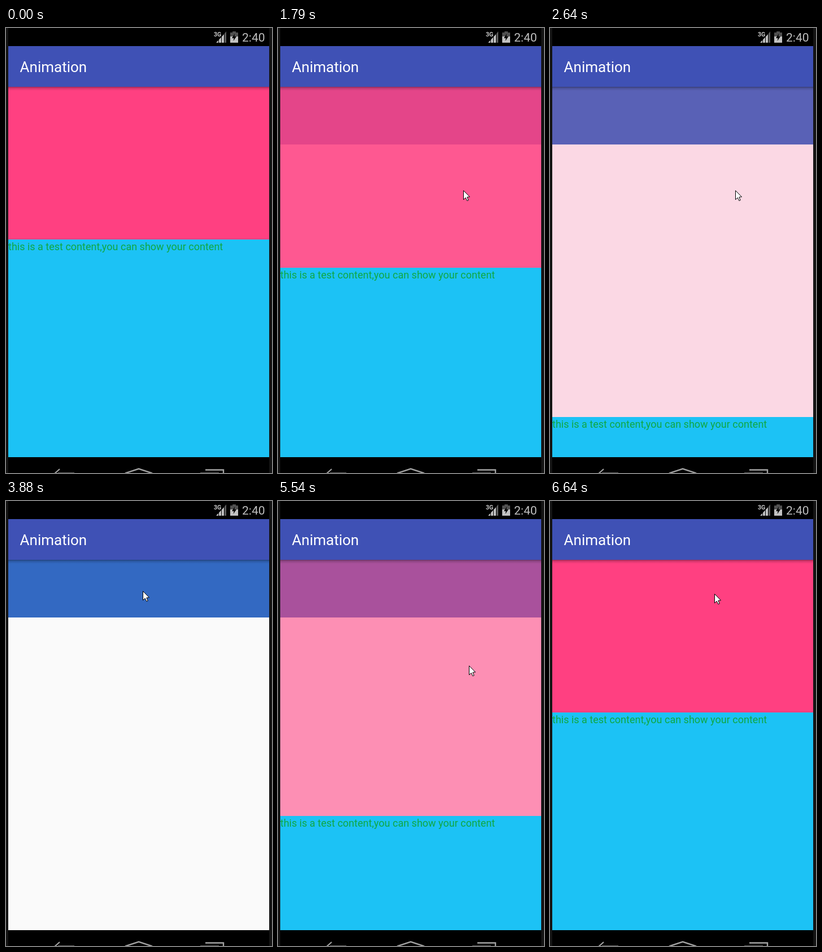
Recreate the animation shown at these times as an HTML page with a canvas. Size 471 px wide and 787 px high, loop 8 s.

```html
<!DOCTYPE html>
<html lang="en">
<head>
<meta charset="utf-8">
<title>Animation</title>
<style>
  html, body { margin: 0; width: 100%; height: 100%; overflow: hidden; background: #000; }
  canvas { display: block; width: 471px; height: 787px; }
</style>
</head>
<body>
<canvas id="stage" width="471" height="787"></canvas>
<script>
const ctx = document.getElementById('stage').getContext('2d');
const LOOP = 8000, FIRST_TICK = 675, TICK = 138.6, LAST_TICK = 43, RETURN_TICK = 27;
const LEFT = 4, WIDTH = 462, TOP = 104, BOTTOM = 759, HEADER_END = 206, REST = 374;
const PINK = [255, 64, 129], PAPER = [250, 250, 250], BLUE = [51, 105, 194];

// Key points: [tick, ...values], linear in between.
const SLIDE = [[4, 0], [8, 0.13], [11, 0.383], [14, 0.816], [18, 1],
  [RETURN_TICK, 1], [30, 0.912], [34, 0.737], [35, 0.475], [42, 0]];
const POINTER = [[0, 337, 377], [2, 328, 287], [17, 328, 287], [20, 199, 187], [23, 242, 159],
  [RETURN_TICK, 242, 159], [30, 282, 238], [35, 338, 291], [LAST_TICK, 291, 164]];

const mix = (a, b, k) => a + (b - a) * k;

function sample(track, tick) {
  const next = track.findIndex(row => row[0] > tick);
  if (next === 0) return track[0].slice(1);
  if (next < 0) return track[track.length - 1].slice(1);
  const a = track[next - 1], b = track[next];
  const k = (tick - a[0]) / (b[0] - a[0]);
  return a.slice(1).map((v, i) => mix(v, b[i + 1], k));
}

function blend(a, b, k) {
  return `rgb(${a.map((v, i) => Math.round(mix(v, b[i], k)))})`;
}

function box(color, x, y, w, h) {
  ctx.fillStyle = color;
  ctx.fillRect(x, y, w, h);
}

function band(color, from, to) {
  box(color, LEFT, from, WIDTH, to - from);
}

function label(str, x, y, size, color, weight = 400) {
  ctx.font = `${weight} ${size}px Roboto, sans-serif`;
  ctx.fontKerning = 'none';
  ctx.fillStyle = color;
  ctx.fillText(str, x, y);
}

function path(points, closed) {
  ctx.beginPath();
  points.forEach(([x, y]) => ctx.lineTo(x, y));
  if (closed) ctx.closePath();
}

function shape(color, ...points) {
  path(points, true);
  ctx.fillStyle = color;
  ctx.fill();
}

function line(color, width, ...points) {
  path(points);
  ctx.strokeStyle = color;
  ctx.lineWidth = width;
  ctx.stroke();
}

function statusBar() {
  band('#000', 0, 32);
  // signal
  shape('#c2c2c2', [372, 26], [386, 11], [386, 26]);
  shape('#5c5c5c', [386, 11], [390, 6], [390, 26], [386, 26]);
  for (let x = 376; x <= 386; x += 5) box('#000', x, 8, 1, 18);
  label('3G', 368, 15, 10.5, '#c8c8c8', 700);
  // charging battery
  box('#505050', 401, 6, 6, 3);
  box('#505050', 397, 8, 14, 8);
  box('#c2c2c2', 397, 15, 14, 11);
  shape('#000', [405, 10], [400, 18], [403.5, 18], [402.5, 23], [408, 15], [404.5, 15]);
  label('2:40', 418, 24, 21, '#c0c0c0');
}

function toolbar() {
  const shade = ctx.createLinearGradient(0, TOP, 0, TOP + 7);
  shade.addColorStop(0, 'rgba(0,0,0,.36)');
  shade.addColorStop(0.4, 'rgba(0,0,0,.14)');
  shade.addColorStop(1, 'rgba(0,0,0,0)');
  band(shade, TOP, TOP + 7);
  band('#3f51b5', 32, TOP);
  label('Animation', 24.6, 78, 26, '#fff');
}

function navBar() {
  const gray = '#a2a2a2', dim = '#666';
  band('#000', BOTTOM, 787);
  line(gray, 2.2, [85, 789], [95, 780]);
  box(dim, 92, 786, 29, 1);
  line(gray, 2.4, [211, 787.5], [235, 779.5], [259, 787.5]);
  line(gray, 2.4, [353, 781.5], [385, 781.5], [385, 788]);
  box(dim, 344, 786, 33, 1);
}

function panel(y) {
  if (y >= BOTTOM) return;
  band('#1cc2f5', y, BOTTOM);
  label('this is a test content,you can show your content', LEFT, y + 19, 18, '#10a843');
}

function pointer(x, y) {
  ctx.save();
  ctx.translate(Math.round(x) + 0.5, Math.round(y) + 0.5);
  const outline = [[0, 0], [0, 16], [3.7, 12.6], [6.3, 18], [8.7, 17], [6.3, 11.6], [11, 11.2]];
  shape('#fff', ...outline);
  line('#000', 1, ...outline, outline[0]);
  ctx.restore();
}

function draw(now) {
  const tick = Math.min(LAST_TICK, Math.floor((now % LOOP - FIRST_TICK) / TICK));
  const [open] = sample(SLIDE, tick);
  // On the way back the colours run slightly ahead of the panel.
  const fade = open - (tick > RETURN_TICK ? 0.21 * open * (1 - open) : 0);

  box('#141414', 0, 0, 471, 787);
  band(blend(PINK, PAPER, fade), TOP, BOTTOM);
  band(blend(PINK, BLUE, fade), TOP, HEADER_END);
  panel(Math.round(mix(REST, BOTTOM, open)));
  toolbar();
  statusBar();
  navBar();
  if (tick >= 0) pointer(...sample(POINTER, tick));
}

const start = performance.now();
function loop() {
  draw(performance.now() - start);
  requestAnimationFrame(loop);
}
loop();
</script>
</body>
</html>
```
